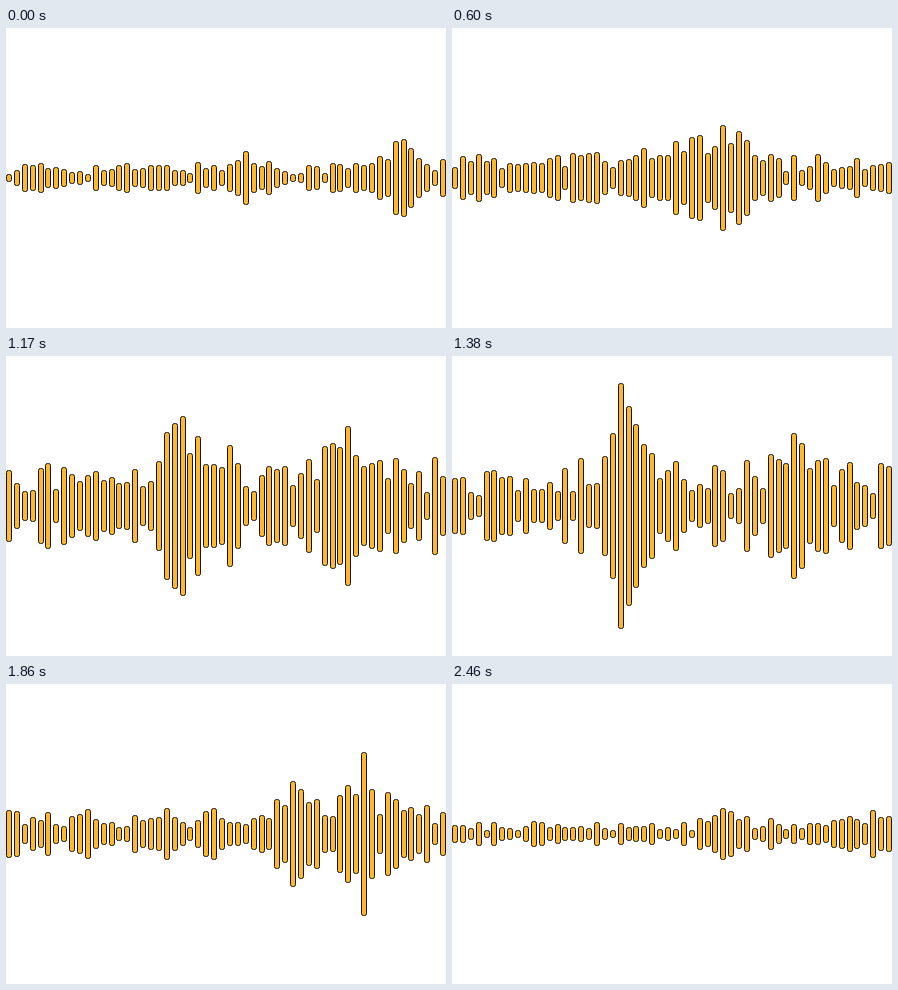
An HTML page with a canvas for the animation above (2.49 s loop, 440 by 300 pixels).

```html
<!DOCTYPE html>
<html lang="en">
<head>
<meta charset="utf-8">
<title>Sound wave</title>
<style>
  html, body { margin: 0; width: 100%; height: 100%; overflow: hidden; background: #fff; }
  canvas { display: block; }
</style>
</head>
<body>
<canvas id="stage" width="440" height="300"></canvas>
<script>
const ctx = document.getElementById('stage').getContext('2d');
const LOOP = 2490, STEP = 30, BARS = 56, MIDDLE = 150;

const mix = (a, b, f) => a + (b - a) * f;
const smooth = f => f * f * (3 - 2 * f);

// Repeatable random number in 0..1
function random(a, b) {
  const s = Math.sin(a * 127.1 + b * 311.7) * 43758.5453;
  return s - Math.floor(s);
}

// Sound at key moments: overall level and two crests that rise above it
const sounds = [
  { time: 0, level: 10, crests: [{ bar: 30, rise: 14 }, { bar: 50, rise: 33 }] },
  { time: 600, level: 16, crests: [{ bar: 28, rise: 22 }, { bar: 34, rise: 45 }] },
  { time: 930, level: 31, crests: [{ bar: 24, rise: 72 }, { bar: 40, rise: 30 }] },
  { time: 1380, level: 27, crests: [{ bar: 21, rise: 82 }, { bar: 43, rise: 50 }] },
  { time: 1860, level: 17, crests: [{ bar: 37, rise: 35 }, { bar: 45, rise: 58 }] },
  { time: 2220, level: 24, crests: [{ bar: 28, rise: 36 }, { bar: 50, rise: 30 }] },
  { time: 2460, level: 9, crests: [{ bar: 35, rise: 16 }, { bar: 53, rise: 12 }] }
];

// Every bar is rough; a crest is exact at its top and falls off to both sides
function soundHeight({ time, level, crests }, bar) {
  const rough = mix(0.4, 1.6, random(bar, time));
  return crests.reduce((height, crest) => {
    const near = Math.exp(-Math.abs(bar - crest.bar) / 2);
    return height + crest.rise * near * mix(rough, 1, near);
  }, level * rough);
}

// Smooth flicker in -0.4..0.6, a new value every 120 ms
function flicker(bar, t) {
  const beat = Math.floor(t / 120);
  const f = smooth(t / 120 - beat);
  return mix(random(bar, beat + 0.5), random(bar, beat + 1.5), f) - 0.4;
}

function halfHeight(bar, t) {
  const next = sounds.findIndex(s => s.time > t);
  if (next < 0) return soundHeight(sounds[sounds.length - 1], bar);
  const from = sounds[next - 1], to = sounds[next];
  const f = (t - from.time) / (to.time - from.time);
  const height = mix(soundHeight(from, bar), soundHeight(to, bar), smooth(f));
  return height * (1 + Math.sin(Math.PI * f) * flicker(bar, t));
}

function draw(now) {
  const t = Math.floor(now % LOOP / STEP) * STEP;
  ctx.fillStyle = '#fff';
  ctx.fillRect(0, 0, 440, 300);
  ctx.fillStyle = '#fdb92b';
  ctx.strokeStyle = '#111';
  for (let bar = 0; bar < BARS; bar++) {
    const x = Math.round(3 + bar * 434 / (BARS - 1));
    const h = Math.round(Math.max(4, halfHeight(bar, t))) - 0.5;
    ctx.beginPath();
    ctx.roundRect(x - 2.5, MIDDLE - h, 5, 2 * h, 2);
    ctx.fill();
    ctx.stroke();
  }
  requestAnimationFrame(draw);
}
requestAnimationFrame(draw);
</script>
</body>
</html>
```
